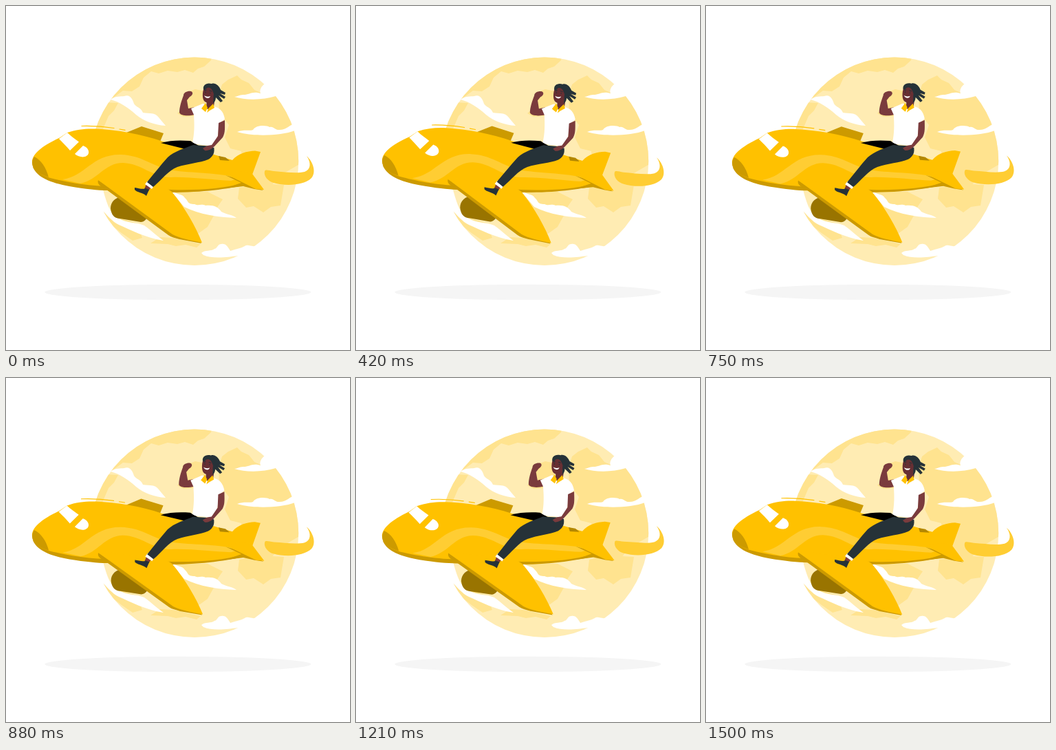
An HTML page with a canvas that plays this animation: 500 px wide and 500 px high, repeating every 1.54 s.

```html
<!DOCTYPE html>
<html lang="en">
<head>
<meta charset="utf-8">
<title>Plane ride</title>
<style>
html, body { margin: 0; width: 100%; height: 100%; overflow: hidden; background: #fff; }
canvas { display: block; width: 100vmin; height: 100vmin; }
</style>
</head>
<body>
<canvas></canvas>
<script>
const canvas = document.querySelector('canvas');
const ctx = canvas.getContext('2d');
const SIZE = 500, LOOP = 1540, REST_ANGLE = 0.13;
const PIVOT = { x: 243, y: 229 };
const YELLOW = '#ffc100', SHADE = '#cc9a00', LIGHT = '#ffcd33';
const SKIN = '#7a3b3d', FACE = '#672f33', DARK = '#263238', WHITE = '#fff';
const PALE = '#ffecb3', LAND = '#ffe38f';

const shape = (color, d, stroke = 0) => ({ color, path: new Path2D(d), stroke });

const lands = [
  'M300 70L298 79L288 88L279 91L272 97L260 93L249 96L235 94L222 98L211 95L200 104L194 117L183 124L170 123L140 145L150 60Z',
  'M310 154L309 130L314 114L323 107L336 101L342 107L353 112L361 122L372 127L430 120L430 228L397 247L385 262L345 262L342 211L326 207L318 191L324 173Z',
  'M145 140L163 141L157 152L149 160L143 174L136 190L120 190Z',
  'M249 156L257 149L262 126L275 121L290 124L289 146L273 160L258 161Z',
  'M339 264L368 258L404 260L399 290L385 292L374 300L360 291L349 293L337 280Z',
  'M139 291L155 301L168 309L190 316L198 337L184 341L168 330L148 314Z',
  'M210 345L224 336L243 337L261 341L283 346L277 351L261 347L247 349L235 346Z',
  'M246 270L293 270L315 281L308 291L304 301L293 321L279 331L250 310Z'
].map(d => shape(LAND, d));

const clouds = [
  'M376 113C371 117 368 122 370 127C358 123 354 129 345 129C339 129 336 132 332 132C348 137 373 137 392 131L403 119L383 103Z',
  'M336 183C346 179 353 182 359 180C363 173 378 173 383 176C389 174 391 181 398 180C407 180 411 174 417 172L430 166L430 182L420 181C399 189 358 190 336 183Z',
  'M152 136C160 130 166 132 172 131C180 128 184 135 186 142C190 148 196 147 199 155C209 157 216 154 222 162C226 167 229 170 232 174C215 173 200 167 189 158C178 148 165 139 152 136L139 142Z',
  'M238 267C248 275 256 272 260 279C265 283 263 288 274 288C280 291 283 287 290 290C302 289 308 292 313 299C322 304 329 303 335 308C308 307 281 303 259 292Z',
  'M125 260L141 267C145 281 150 301 162 308C176 316 190 314 201 319C211 326 220 335 229 341C203 337 180 325 164 318C154 313 147 304 142 299L130 296Z',
  'M284 359C289 354 298 357 303 353C308 352 307 346 313 346C320 345 322 350 326 356C335 353 342 352 347 349C352 346 356 350 362 349L371 357L350 371L337 363C323 365 300 368 287 362Z'
].map(d => shape(WHITE, d));

const plane = [
  shape(LIGHT, 'M437 218C447 227 451 242 444 250C433 261 406 262 389 257C381 255 374 247 376 240C377 237 382 239 389 240C405 241 422 244 434 241C443 238 444 228 437 218Z'),
  shape(SHADE, 'M175 184L197 175L229 185L224 197L212 197Z'),
  // fuselage and tail
  shape(SHADE, 'M39 234C45 249 65 257 92 262C116 266 134 268 147 268L240 271C287 271 322 266 348 260L336 245L70 240Z'),
  shape(YELLOW, 'M38 228C37 216 51 204 78 191.5L89 184C103 179 117 178 130 178.5C162 180 196 186 228 197L286 211L329 224C338 214 350 211 362 210.5L370 212L358 245L347 257C315 266 278 268 240 267L145 262C112 261 79 254 61 249C47 244 39 237 38 228Z'),
  shape(LIGHT, 'M82 252C115 248 125 215 167 216C197 217 211 232 238 238C262 243 300 241 341 250L327 254C301 253 266 248 240 249C212 249 198 229 170 228C143 228 134 253 108 258Z'),
  shape(SHADE, 'M41 219C51 224 58 234 62 249C47 244 38 238 38 228C38 225 39 222 41 219Z'),
  shape('#b38700', 'M309 218L319 220L325 225L311 224Z'),
  shape(SHADE, 'M319 246L350 255L374 268L361 266L345 262L318 265L342 257Z'),
  shape(YELLOW, 'M319 244C335 240 350 238 358 244L375 267L363 266Z'),
  // windows
  shape(WHITE, 'M77 193L89 184C94 189 100 193 106 197.5L93 210C88 204 82 198 77 193Z'),
  shape(WHITE, 'M100 215L112 203C118 205 121 210 120 214C118 221 107 221 100 215Z'),
  shape(YELLOW, 'M110 174.5C126 174 141 175 157 177.5M165 179L173 180.3', 1.2),
  shape('#000', 'M225 199C239 195 253 195 268 196L280 203L269 210Z'),
  // engine and near wing
  shape('#997400', 'M174 277C160 276 152 284 152 294C153 304 158 309 166 309L196 314C201 314 205 309 207 304L192 286Z'),
  shape(SHADE, 'M134 253C132 258 137 262 142 264L236 333C240 336 246 337 252 339L284 345L280 339L239 324Z'),
  shape(YELLOW, 'M134 253C142 250 154 252 165 255L216 261C226 263 234 264 241 270C260 293 276 321 285 344C269 341 251 337 242 332Z')
];

const rider = [
  // raised arm
  shape(SKIN, 'M258 130C258 125 265 123 269 124C273 126 271 130 267 132L263 137L265 149L274 147L274 158C266 160 254 160 252 155C252 147 255 138 258 130Z'),
  // leg and shoe
  shape(SKIN, 'M204 259L211 263L207 269L201 266Z'),
  shape(DARK, 'M187 264C193 265 199 267 203 265L208 267L204 276C199 271 190 271 187 267Z'),
  shape(WHITE, 'M206 254L215 261L212 266L202 259Z'),
  shape(DARK, 'M272 202C259 207 245 211 235 220C225 231 215 244 205 256L214 263C226 253 236 239 249 234C264 229 282 228 294 223C301 219 304 213 302 204Z'),
  // shirt
  shape(WHITE, 'M269 149L286 142L302 146C311 148 316 153 318 164L310 171C309 184 307 195 302 206C289 199 279 204 271 198C274 186 274 172 273 158Z'),
  shape(SKIN, 'M309 170L318 166C318 176 319 184 315 191L303 204C298 209 292 211 289 210L286 207L293 203L299 202L308 189Z'),
  // head
  shape(FACE, 'M292 135L304 132L302 146C299 152 293 151 291 148Z'),
  shape(YELLOW, 'M290 141L284 149L290 154L293 148ZM301 142L303 148L296 152L292 155L294 149Z'),
  shape(FACE, 'M288 118C285 126 285 136 289 139C295 143 302 139 304 132C307 124 304 115 297 114Z'),
  shape(WHITE, 'M288 130C291 132 294 132 297 131C296 135 290 135 288 130Z'),
  shape(DARK, 'M287 121C286 115 291 111 299 113C304 111 310 116 312 122L319 126L318 129L311 127L319 132L317 135L309 130L315 138L312 140L305 133C305 137 303 140 301 141C302 136 301 132 302 128C300 121 297 117 292 119C290 122 288 123 287 121Z'),
  shape(DARK, 'M289 123L291 122M296 123L299 124M290 125L290 126M297 126L297 127', 1)
];

function paint(parts) {
  for (const { color, path, stroke } of parts) {
    ctx.fillStyle = ctx.strokeStyle = color;
    ctx.lineWidth = stroke;
    if (stroke) ctx.stroke(path);
    else ctx.fill(path);
  }
}

function ellipse(x, y, rx, ry, color) {
  ctx.beginPath();
  ctx.ellipse(x, y, rx, ry, 0, 0, Math.PI * 2);
  ctx.fillStyle = color;
  ctx.fill();
}

function drawBackdrop() {
  ctx.fillStyle = WHITE;
  ctx.fillRect(0, 0, SIZE, SIZE);
  ctx.save();
  ellipse(274, 225.7, 151.2, 151.2, PALE);
  ctx.clip();
  paint(lands);
  ctx.restore();
  paint(clouds);
  ellipse(249.8, 416, 193.5, 11.3, '#f5f5f5');
}

// Triangle wave between +1 and -1 degrees.
function tilt(time) {
  const phase = ((time + 50) / LOOP + 0.25) % 1;
  return 1 - Math.abs(4 * phase - 2);
}

function draw(now) {
  const side = Math.min(innerWidth, innerHeight);
  const pixels = Math.round(side * devicePixelRatio);
  if (canvas.width !== pixels) canvas.width = canvas.height = pixels;
  ctx.setTransform(pixels / SIZE, 0, 0, pixels / SIZE, 0, 0);
  ctx.lineCap = 'round';
  drawBackdrop();
  ctx.translate(PIVOT.x, PIVOT.y);
  ctx.rotate((tilt(now % LOOP) - REST_ANGLE) * Math.PI / 180);
  ctx.translate(-PIVOT.x, -PIVOT.y);
  paint(plane);
  paint(rider);
  requestAnimationFrame(draw);
}

requestAnimationFrame(draw);
</script>
</body>
</html>
```
